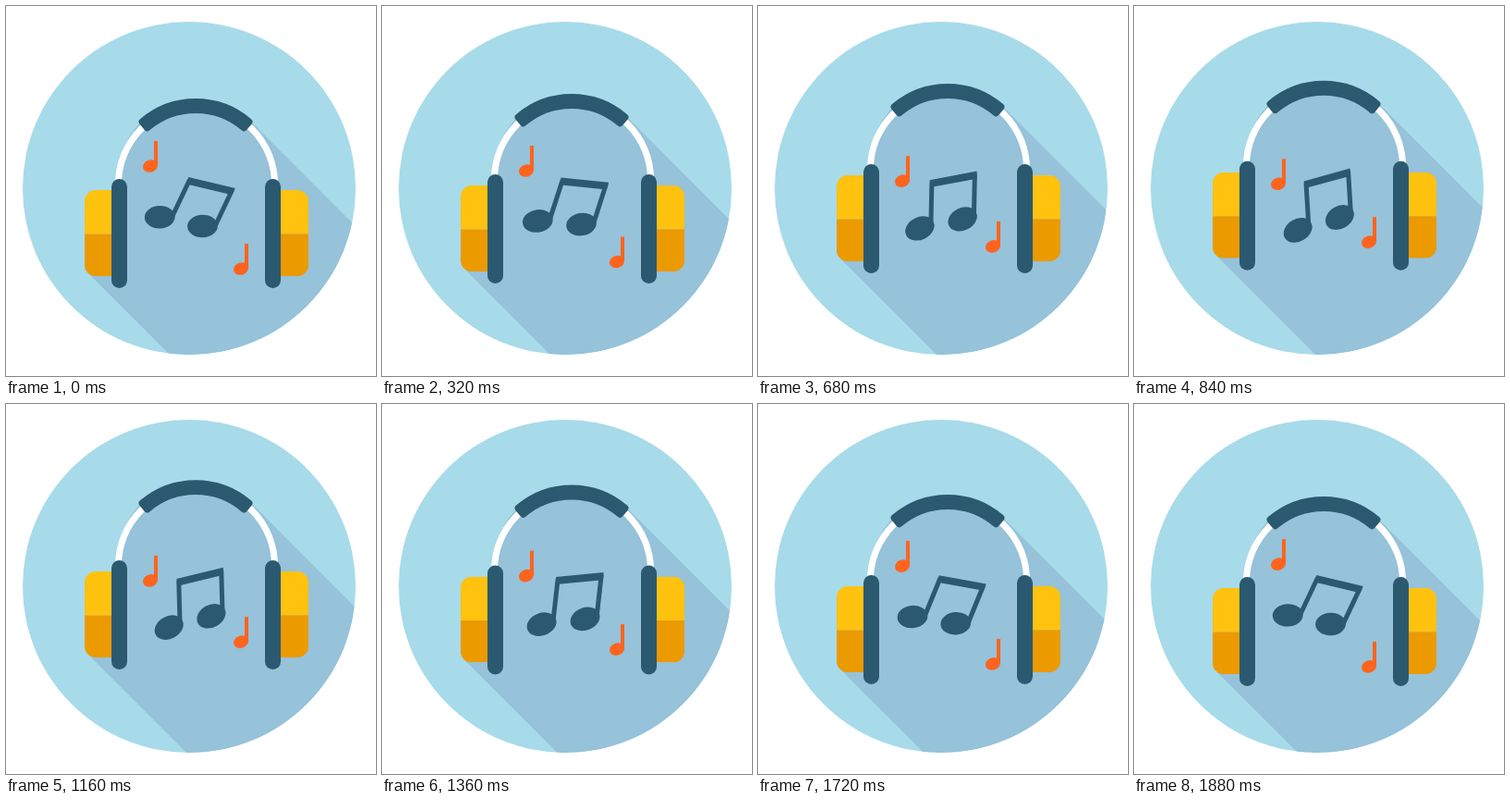
Animation, 400 px wide and 400 px high, one loop 1920 ms. Source, as an HTML page:

```html
<!DOCTYPE html>
<html lang="en">
<head>
<meta charset="utf-8">
<title>Headphones</title>
<style>
  html, body { margin: 0; width: 100%; height: 100%; overflow: hidden; background: #fff; }
  svg { display: block; width: 100vw; height: 100vh; }
</style>
</head>
<body>
<svg viewBox="0 0 400 400">
  <defs>
    <clipPath id="disc"><circle cx="198" cy="197" r="180"/></clipPath>
    <clipPath id="pads">
      <rect x="85" y="199" width="60" height="93" rx="12"/>
      <rect x="267" y="199" width="60" height="93" rx="12"/>
    </clipPath>
    <g id="note" fill="#ff641e">
      <ellipse rx="8.2" ry="6.6" transform="rotate(-20)"/>
      <rect x="4" y="-27" width="4" height="26"/>
    </g>
  </defs>

  <circle cx="198" cy="197" r="180" fill="#a7dbe9"/>
  <g clip-path="url(#disc)">
    <path id="shadow" fill="#96c2da"
      d="M88.5 288.5 L288.5 488.5 H628 L265 125 A84.5 84.5 0 0 0 121.5 192.5 V290 Z"/>
  </g>

  <g id="phones">
    <path d="M121.5 200 V192.5 A84.5 84.5 0 0 1 290.5 192.5 V200" fill="none" stroke="#fff" stroke-width="7"/>
    <path transform="translate(205 192.5)" fill="#2b5a70" stroke="#2b5a70" stroke-width="8" stroke-linejoin="round"
      d="M-57.4 -67.3 A88.5 88.5 0 0 1 57.4 -67.3 L52.3 -61.2 A80.5 80.5 0 0 0 -52.3 -61.2 Z"/>
    <g clip-path="url(#pads)">
      <path fill="#ffc20f" d="M85 199 H122 V246.5 H85 Z M289 199 H327 V246.5 H289 Z"/>
      <path fill="#eb9a00" d="M85 246.5 H122 V292 H85 Z M289 246.5 H327 V292 H289 Z"/>
    </g>
    <g fill="#2b5a70">
      <rect x="114" y="187" width="17" height="118" rx="8.5"/>
      <rect x="280" y="187" width="17" height="118" rx="8.5"/>
    </g>
  </g>

  <g id="pair" fill="#2b5a70">
    <ellipse cx="166.2" cy="228.3" rx="16.4" ry="12.2" transform="rotate(-2 166.2 228.3)"/>
    <ellipse cx="212.5" cy="238" rx="16.4" ry="12.2" transform="rotate(-2 212.5 238)"/>
    <path d="M180 227 L198.5 188 M226.5 237 L244.7 198.5" stroke="#2b5a70" stroke-width="5"/>
    <path d="M197.3 185 L247.8 197 L244.3 204.3 L195 192.5 Z"/>
  </g>
  <use id="high" href="#note"/>
  <use id="low" href="#note"/>
</svg>
<script>
  const LOOP = 1920, STEP = 40;
  const pose = (id, value) => document.getElementById(id).setAttribute('transform', value);
  const start = performance.now();

  function draw() {
    const t = Math.floor((performance.now() - start) / STEP) * STEP % LOOP;
    const p = (1 - Math.cos(2 * Math.PI * t / LOOP)) / 2;
    const lift = `translate(0 ${-20 * p})`;
    pose('phones', lift);
    pose('shadow', lift);
    pose('pair', `rotate(${-30 * p} 199 214)`);
    pose('high', `translate(156 ${173 + 20 * p})`);
    pose('low', `translate(254 ${284 - 30 * p})`);
    requestAnimationFrame(draw);
  }
  draw();
</script>
</body>
</html>
```
